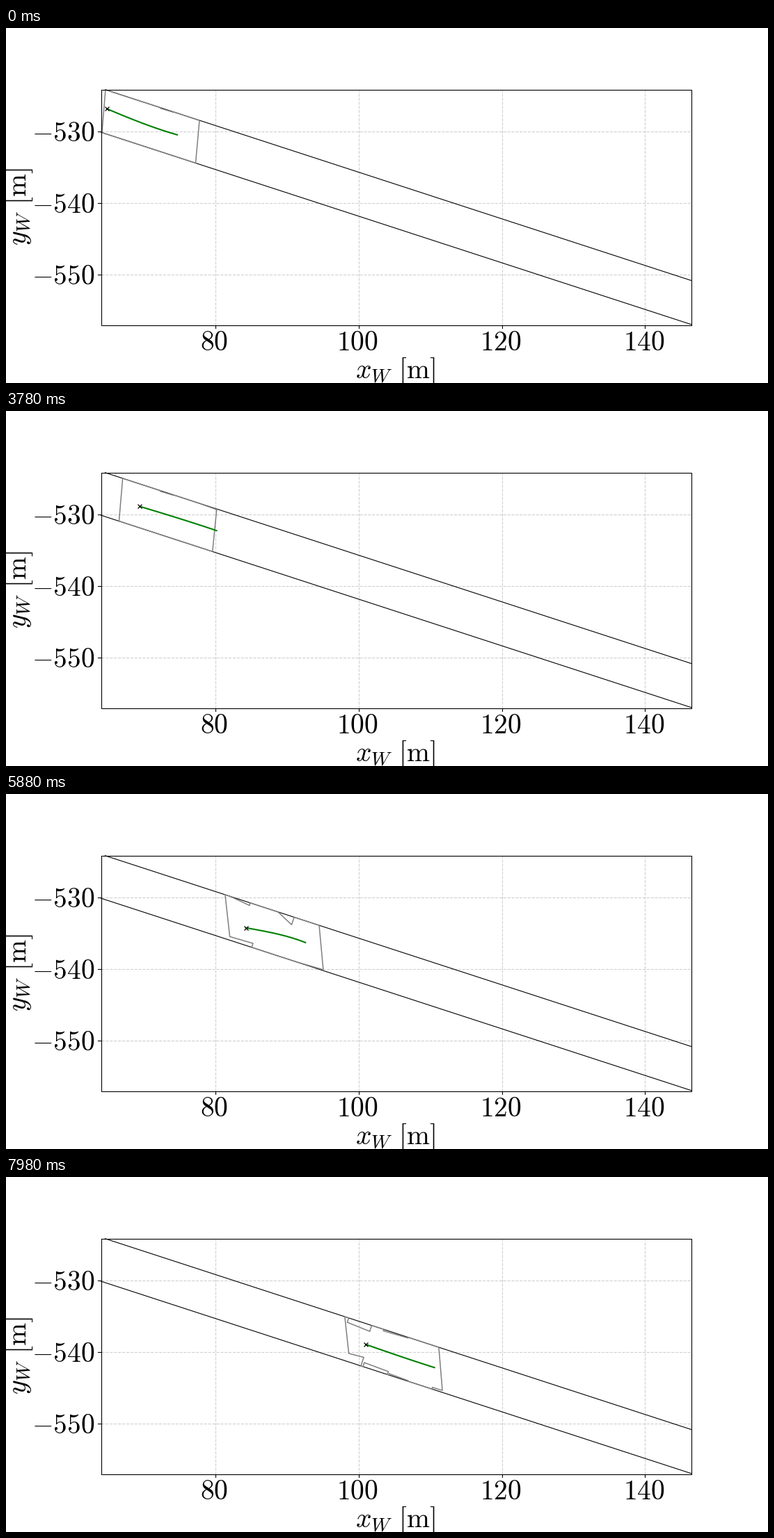
A matplotlib script for the animation above (8 s loop, 1095 px wide and 511 px high).

```python
import matplotlib.pyplot as plt
import numpy as np
from matplotlib.animation import FuncAnimation

W, H, DPI = 1095, 511, 100
LOOP_MS, STEP_MS = 8000, 32
LEFT, RIGHT, TOP, BOTTOM = 137, 985.2, 88.7, 427.6
SLOPE = 0.3262
FONT = 28.5

# Replanning rhythm and horizon in seconds, shortest reach in pixels.
FIRST_PLAN, PLAN_EVERY, HORIZON, MIN_END = 3.21, 0.54, 1.62, 246

# Notches in the road edges: first x, last x, depth at each.
UPPER_NOTCHES = [(222, 241, 0.9, 0.5), (273, 308, 0, 1), (322, 351, 0, 3.8),
                 (391, 414, 0, 11.5), (492.5, 525.5, 6.6, 9), (543, 578, 2.2, 1)]
LOWER_NOTCHES = [(296.5, 353, 4.2, 6), (420, 462, 0, 1.5), (470, 510, 10.5, 13),
                 (513, 548, 6, 4.5), (550, 578, 2, 0.8), (612, 645, 2.5, 3)]


def upper_road(x):
    return 88.9 + SLOPE * (x - 143)


def lower_road(x):
    return 150.4 + SLOPE * (x - 137.5)


def centre(x):
    return 153.7 + SLOPE * (x - 246)


def travel(t):
    """Distance along x and its speed at t seconds: soft start, then gentle gain."""
    soft = 0.11
    z = (t - 3.082) / soft
    r = soft * np.log1p(np.exp(z))
    rate = 1 / (1 + np.exp(-z))
    return 145 + 66.8 * r + 1.91 * r**2, (66.8 + 3.82 * r) * rate


def lateral(x):
    """Offset of the vehicle from the lane centre."""
    s = x - 145
    swerve = 6.4 * np.exp(-((x - 347) / 80)**2)
    return 2 - 0.0085 * s - 6.45 * np.exp(-(s / 30)**2) + swerve


def planned_path(t, x):
    """Cubic from the vehicle back to the lane centre."""
    count = max(-1, (t - FIRST_PLAN) // PLAN_EVERY)
    plan_x, speed = travel(FIRST_PLAN + count * PLAN_EVERY)
    end = max(MIN_END, plan_x + HORIZON * speed)
    off, width = lateral(x), end - x
    u = np.linspace(0, 1, 40)
    shift = (off * (2*u**3 - 3*u**2 + 1)
             - 0.022 * off * width * (u**3 - 2*u**2 + u)
             + 0.010 * off * width * (u**3 - u**2))
    xs = x + u * width
    return xs, centre(xs) + shift


def notched_edge(road, notches, side):
    """Road edge with its notches, sampled at quarter pixel steps."""
    pts = [(LEFT, road(LEFT))]
    for a, b, depth_a, depth_b in notches:
        pts.append((a, road(a)))
        for x, depth in [(a, depth_a), (b, depth_b)]:
            pts.append((x - side * 0.31 * depth, road(x) + side * 0.95 * depth))
        pts.append((b, road(b)))
    pts = np.array(pts + [(700, road(700))])
    dist = np.r_[0, np.cumsum(np.hypot(*np.diff(pts, axis=0).T))]
    s = np.union1d(np.arange(0, dist[-1], 0.25), dist)
    return np.column_stack([np.interp(s, dist, col) for col in pts.T])


UPPER_EDGE = notched_edge(upper_road, UPPER_NOTCHES, 1)
LOWER_EDGE = notched_edge(lower_road, LOWER_NOTCHES, -1)


def clip_edge(edge, x, start, pitch, lag):
    """Keep eleven stations of an edge, beginning just behind the vehicle."""
    first = max(0, round((x - start) / pitch - lag))
    a = start + first * pitch
    b = a + 11 * pitch
    return edge[(edge[:, 0] >= a - 0.1) & (edge[:, 0] <= b + 0.1)]


def corridor(x):
    top = clip_edge(UPPER_EDGE, x, 143, 12.28, 2.2)
    low = clip_edge(LOWER_EDGE, x, 138, 12.23, 2.4)
    return np.vstack([top, low[::-1], top[:1]])


plt.rcParams["mathtext.fontset"] = "cm"
fig = plt.figure(figsize=(W / DPI, H / DPI), dpi=DPI, facecolor="white")
ax = fig.add_axes([0, 0, 1, 1])
ax.set_xlim(0, W)
ax.set_ylim(H, 0)
ax.axis("off")


def line(xs, ys, color="black", lw=0.8, **kw):
    return ax.plot(xs, ys, color=color, lw=lw, **kw)[0]


def label(x, y, text, **kw):
    ax.text(x, y, text, fontsize=FONT, va="baseline", **kw)


TICK, GRID = 4.9, "#d0d0d0"
for i in range(4):
    x = 301 + 205.8 * i
    line([x, x], [BOTTOM, TOP], GRID, ls="--")
    line([x, x], [BOTTOM, BOTTOM + TICK])
    label(x - 2, 464, f"${80 + 20 * i}$", ha="center")

for i in range(3):
    y = 149.5 + 102.9 * i
    line([LEFT, RIGHT], [y, y], GRID, ls="--")
    line([LEFT - TICK, LEFT], [y, y])
    label(127.6, y + 13.7, f"${-530 - 10 * i}$", ha="right")

label(559.5, 504.3, r"$x_W\ \mathrm{[m]}$", ha="center")
label(28.7, 257.5, r"$y_W\ \mathrm{[m]}$", ha="center",
      rotation=90, rotation_mode="anchor")

for road, start in [(upper_road, 142.5), (lower_road, LEFT)]:
    line([start, RIGHT], [road(start), road(RIGHT)])

walls = line([], [], "gray", 1.1, solid_joinstyle="miter", zorder=3)
path = line([], [], "green", 1.5, zorder=4)
vehicle = line([], [], marker="x", ms=4, mew=0.9, zorder=5)
line([LEFT, RIGHT, RIGHT, LEFT, LEFT], [TOP, TOP, BOTTOM, BOTTOM, TOP], zorder=6)


def draw(i):
    t = i * STEP_MS / 1000
    x, _ = travel(t)
    walls.set_data(*corridor(x).T)
    path.set_data(*planned_path(t, x))
    vehicle.set_data([x], [centre(x) + lateral(x)])
    return walls, path, vehicle


anim = FuncAnimation(fig, draw, frames=LOOP_MS // STEP_MS, interval=STEP_MS,
                     repeat=True, repeat_delay=0)
plt.show()
```
